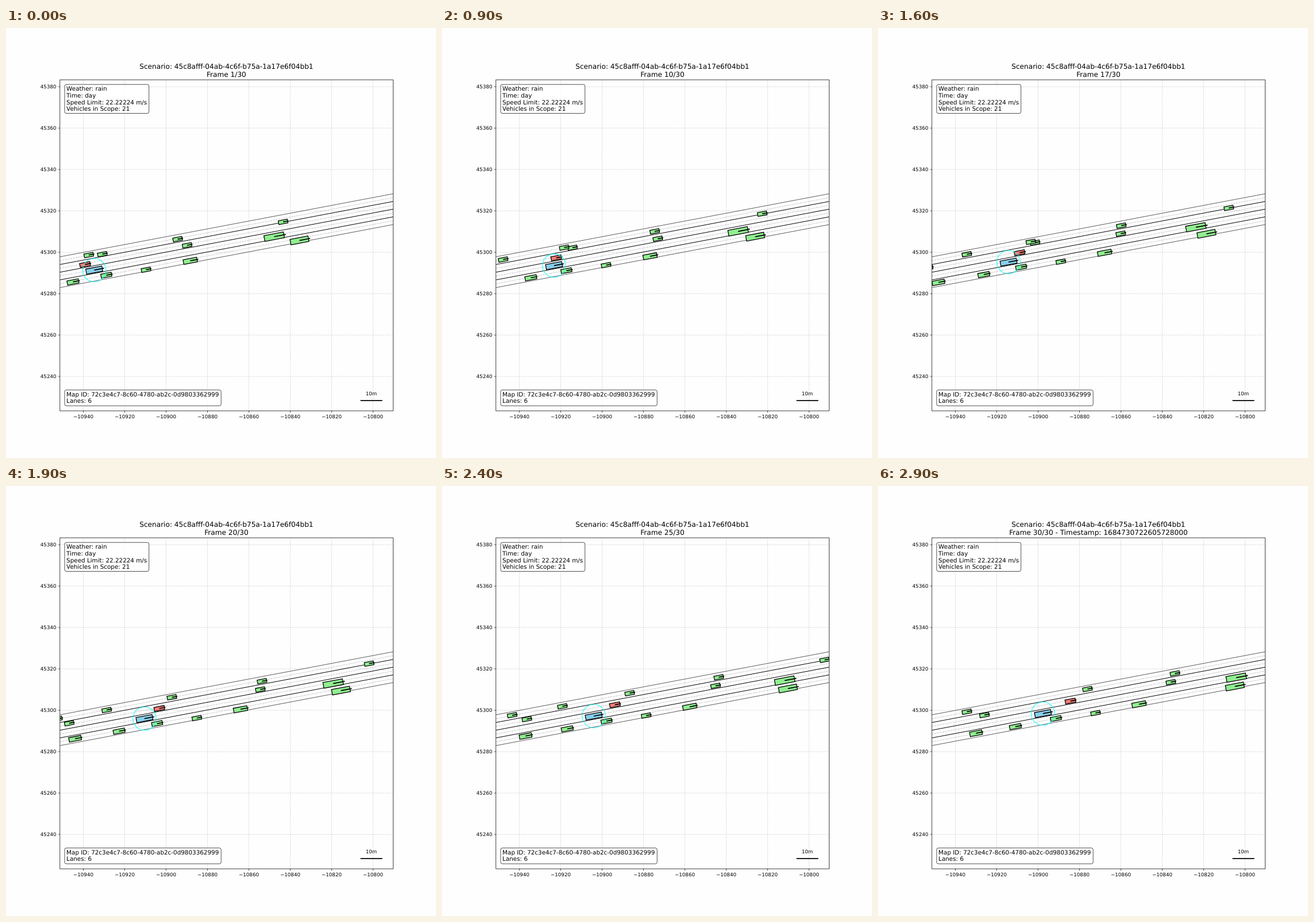
An HTML page with a canvas for the animation above (3000 ms loop, 748 px wide and 748 px high).

```html
<!DOCTYPE html>
<html lang="en">
<head>
<meta charset="utf-8">
<title>Lane scenario</title>
<style>
  html, body { margin: 0; width: 100%; height: 100%; overflow: hidden; background: #fefefe; }
  canvas { display: block; }
</style>
</head>
<body>
<canvas id="stage" width="748" height="748"></canvas>
<script>
const ctx = document.getElementById('stage').getContext('2d');
const STEPS = 30, STEP_MS = 100;
const AXES = { left: 93.8, top: 90.1, right: 673.5, bottom: 666 };
const PT = 0.866; // pixels per point
const SLOPE = 0.1892, LANE_WIDTH = 13.4, LANES = 4;
const CRUISE = 7.6, BRAKING = 0.04;
const GREEN = '#90ee90', BLUE = '#87ceeb', RED = '#f27c74';

// lane counts from the top road edge; speed is in pixels per step
const vehicle = (lane, x, speed, length = 16, extra = {}) =>
  ({ lane, x, speed, length, fill: GREEN, first: 0, last: STEPS, ...extra });

const ego = vehicle(2.57, 153.5, 4.6, 28.5, { fill: BLUE });
const vehicles = [
  ego,
  vehicle(0.7, 167.5, 6.6, 16, { last: 16 }),
  vehicle(0.48, 144, 7.62),
  vehicle(0.6, 298.5, 8.13),
  vehicle(0.95, 482, 8.75),
  vehicle(0.53, 44.5, 6.87, 16, { first: 7, last: 26 }),
  vehicle(0.46, -34, 6.5),
  vehicle(1.62, 137.5, 6.8, 18, { fill: RED }),
  vehicle(1.63, 315, 6.7),
  vehicle(1.32, -33, 7.52),
  vehicle(2.65, 466.5, 5.4, 34.5),
  vehicle(3.53, 174.5, 4.65, 18.5),
  vehicle(3.58, 116.5, 4.22, 20),
  vehicle(3.79, 243.5, 4.65),
  vehicle(3.72, 320.5, 4.6, 24),
  vehicle(3.76, 510.5, 3.8, 31.8),
  vehicle(3.48, 24.6, 5.03, 21.5)
];

const roadY = (lane, x) => 398 - SLOPE * (x - AXES.left) + LANE_WIDTH * lane;

// Vehicles above cruising speed gently brake.
function position(v, step) {
  const braking = BRAKING * Math.max(0, v.speed - CRUISE);
  const x = v.x + v.speed * step - braking * step * step;
  return { x, y: roadY(v.lane, x) };
}

function line(x1, y1, x2, y2, color, width, dash = []) {
  ctx.strokeStyle = color;
  ctx.lineWidth = width;
  ctx.setLineDash(dash);
  ctx.beginPath();
  ctx.moveTo(x1, y1);
  ctx.lineTo(x2, y2);
  ctx.stroke();
  ctx.setLineDash([]);
}

function text(str, x, y, points, align = 'left') {
  ctx.font = `${points * PT}px "DejaVu Sans", sans-serif`;
  ctx.textAlign = align;
  ctx.fillStyle = '#000';
  ctx.fillText(str, x, y);
}

function drawGridAndTicks() {
  const gridColor = 'rgba(176,176,176,.6)', dash = [2.56, 1.11];
  for (let i = 0; i < 8; i++) {
    const x = 134.5 + 72 * i, y = 102.1 + 72 * i;
    line(x, AXES.bottom, x, AXES.top, gridColor, 0.7, dash);
    line(AXES.left, y, AXES.right, y, gridColor, 0.7, dash);
    line(x, AXES.bottom, x, AXES.bottom + 3, '#000', 0.7);
    line(AXES.left - 3, y, AXES.left, y, '#000', 0.7);
    text('\u2212' + (10940 - 20 * i), x, 679.2, 10, 'center');
    text(String(45380 - 20 * i), 87.4, y + 3.2, 10, 'right');
  }
}

function drawRoadLine(lane, color, width, dash) {
  const { left, right } = AXES;
  line(left, roadY(lane, left), right, roadY(lane, right), color, width, dash);
}

function drawRoad() {
  for (let lane = 0; lane <= LANES; lane++) {
    const outer = lane % LANES === 0;
    drawRoadLine(lane, outer ? '#444' : '#000', outer ? 0.87 : 1);
    if (lane < LANES) drawRoadLine(lane + 0.5, 'rgba(128,128,128,.55)', 0.85, [3.2, 1.4]);
  }
}

function drawVehicle(v, step) {
  if (step < v.first || step > v.last) return;
  const { x, y } = position(v, step);
  const width = 3.6 + 0.19 * v.length;
  ctx.save();
  ctx.translate(x, y);
  ctx.rotate(-Math.atan(SLOPE));
  ctx.fillStyle = v.fill;
  ctx.strokeStyle = '#000';
  ctx.lineWidth = 1.3;
  ctx.beginPath();
  ctx.rect(-v.length / 2, -width / 2, v.length, width);
  ctx.fill();
  ctx.stroke();
  line(0, 0, v.length * 0.6, 0, '#000', 1.75);
  ctx.restore();
}

function drawScope(step) {
  const { x, y } = position(ego, step);
  ctx.strokeStyle = 'rgba(0,255,255,.75)';
  ctx.lineWidth = 1.3;
  ctx.beginPath();
  ctx.arc(x, y, 20.3, 0, Math.PI * 2);
  ctx.stroke();
}

function drawPanel(x, y, w, h, lines) {
  ctx.fillStyle = 'rgba(255,255,255,.8)';
  ctx.strokeStyle = 'rgba(0,0,0,.8)';
  ctx.lineWidth = 0.87;
  ctx.beginPath();
  ctx.roundRect(x, y, w, h, 3);
  ctx.fill();
  ctx.stroke();
  lines.forEach((str, i) => text(str, x + 3.1, y + 11.2 + 11.55 * i, 12));
}

function draw(step) {
  const { left, top, right, bottom } = AXES;
  ctx.fillStyle = '#fefefe';
  ctx.fillRect(0, 0, 748, 748);
  drawGridAndTicks();

  ctx.save();
  ctx.beginPath();
  ctx.rect(left, top, right - left, bottom - top);
  ctx.clip();
  drawRoad();
  vehicles.forEach(v => drawVehicle(v, step));
  drawScope(step);
  ctx.restore();

  ctx.strokeStyle = '#000';
  ctx.lineWidth = 0.75;
  ctx.strokeRect(left, top, right - left, bottom - top);

  drawPanel(102, 98.2, 146.7, 50.3, [
    'Weather: rain', 'Time: day', 'Speed Limit: 22.22224 m/s', 'Vehicles in Scope: 21'
  ]);
  drawPanel(102, 629.7, 272.2, 27.5, [
    'Map ID: 72c3e4c7-8c60-4780-ab2c-0d9803362999', 'Lanes: 6'
  ]);

  line(616.6, 648, 654.6, 648, '#000', 1.75);
  text('10m', 635.5, 639, 10, 'center');

  const stamp = step === STEPS - 1 ? ' - Timestamp: 1684730722605728000' : '';
  text('Scenario: 45c8afff-04ab-4c6f-b75a-1a17e6f04bb1', 383.4, 70.8, 14, 'center');
  text(`Frame ${step + 1}/${STEPS}${stamp}`, 383.4, 84.6, 14, 'center');
}

ctx.textRendering = 'geometricPrecision';
const start = performance.now();
function tick() {
  const elapsed = Math.max(0, performance.now() - start);
  draw(Math.floor(elapsed / STEP_MS) % STEPS);
  requestAnimationFrame(tick);
}
tick();
</script>
</body>
</html>
```
